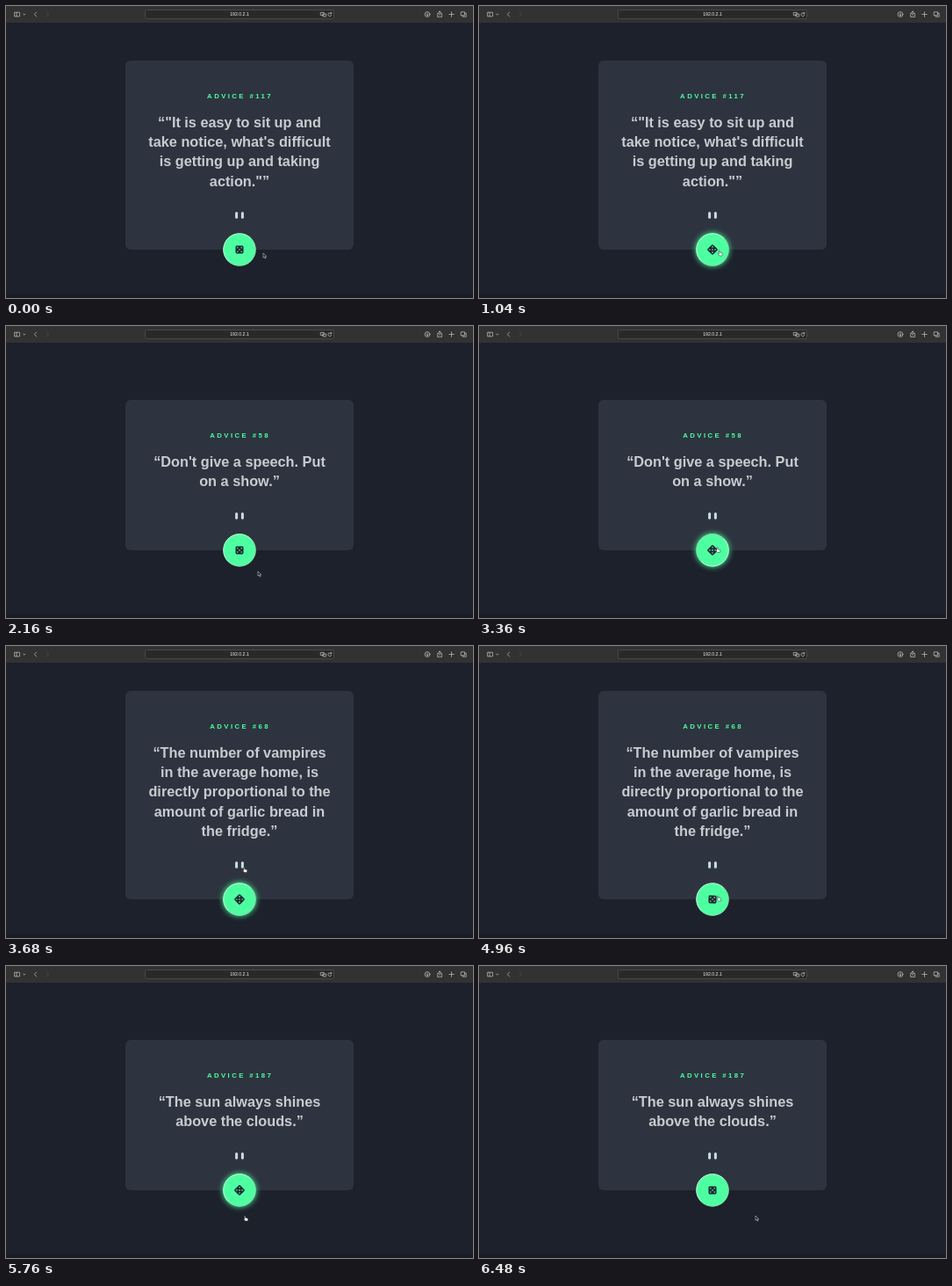
These frames come from a looping animation (532x332 px, 6560 ms). An HTML page:

```html
<!DOCTYPE html>
<html lang="en">
<head>
<meta charset="utf-8">
<title>Advice generator</title>
<style>
  html, body { margin: 0; height: 100%; overflow: hidden; background: #1c212c; }
  svg { display: block; width: 532px; height: 332px; }
  text { font-family: "Liberation Sans", Arial, sans-serif; text-anchor: middle; }
  #label { font-size: 7.8px; font-weight: bold; letter-spacing: 2.4px; fill: #4dffa0; }
  #quote { font-size: 16.3px; font-weight: bold; fill: #c8cbcf; }
  .icons { fill: none; stroke: #c4c4c4; stroke-width: .7; stroke-linecap: round; stroke-linejoin: round; }
</style>
</head>
<body>
<svg viewBox="0 0 532 332">
  <defs>
    <filter id="blur" x="-50%" y="-50%" width="200%" height="200%">
      <feGaussianBlur stdDeviation="3.2"/>
    </filter>
  </defs>
  <rect width="532" height="332" fill="#1c212c"/>
  <rect y="328" width="532" height="4" fill="#181c27"/>

  <!-- browser toolbar -->
  <rect width="532" height="19" fill="#323232"/>
  <rect x="158.5" y="4.5" width="215" height="10" rx="2.2" fill="#292929" stroke="#505050" stroke-width=".8"/>
  <text x="266" y="11.4" font-size="5.2" fill="#f0f0f0">192.0.2.1</text>
  <g class="icons">
    <path d="M10 7.2h5.6v4.6H10zM12 7.2v4.6M19.6 9l1.2 1.2L22 9M34.8 7l-2.5 2.5 2.5 2.5"/>
    <path d="M46.2 7l2.5 2.5-2.5 2.5" stroke="#555"/>
    <path d="M358.6 7.4h3.6v3h-3.6zM361.2 9h3.4v3h-3.4zM370.6 8.6a2 2 0 1 0 .2 1.8M370.8 7.2v1.5h-1.5"/>
    <circle cx="480" cy="9.5" r="2.9"/>
    <path d="M480 8v3m-1.2-1.2l1.2 1.2 1.2-1.2"/>
    <path d="M492.8 8.4h-1.2v4h4.8v-4h-1.2M494 10.4V6m-1.3 1.3L494 6l1.3 1.3"/>
    <path d="M507.5 6.8v5.4m-2.7-2.7h5.4"/>
    <path d="M518.6 6.8h4v4h-4zM522.6 8.2h1.6v4h-4v-1.4"/>
  </g>

  <rect id="card" x="136" width="260" rx="6" fill="#2d343f"/>
  <text id="label"></text>
  <g id="quote"></g>

  <!-- origin: centre of the button -->
  <g id="base">
    <g fill="#cbdce2">
      <rect x="-4.9" y="-43" width="3" height="7.8" rx="1.5"/>
      <rect x="1.9" y="-43" width="3" height="7.8" rx="1.5"/>
    </g>
    <circle id="glow" r="19" fill="#4dffa0" filter="url(#blur)"/>
    <circle r="18.6" fill="#4dffa0"/>
    <g id="rim" fill="none" stroke-width=".8">
      <path d="M-12.9 12.9A18.2 18.2 0 0 1 12.9 -12.9" stroke="#e6f5ec"/>
      <path d="M12.9 -12.9A18.2 18.2 0 0 1 -12.9 12.9" stroke="#9fcdb3"/>
    </g>
    <g id="die" fill="#4dffa0">
      <rect x="-4.5" y="-4.5" width="9" height="9" rx="1.4" fill="#1f2632"/>
      <circle r=".8"/>
      <circle cx="-2.2" cy="-2.2" r=".8"/>
      <circle cx="2.2" cy="-2.2" r=".8"/>
      <circle cx="-2.2" cy="2.2" r=".8"/>
      <circle cx="2.2" cy="2.2" r=".8"/>
    </g>
  </g>

  <g id="cursor" stroke-linejoin="round">
    <path id="arrow" d="M0 0v5.2l1.2-1.1.9 1.9.9-.4-.9-1.8h1.7z" fill="#111" stroke="#eee" stroke-width=".5"/>
    <path id="hand" d="M0 .3q.6-.6 1 .1l.5 1.8 2 .5q.9.3.8 1.2l-.5 2.1H1.1L-.8 3.7q0-.7.8-.3l.5.4z" fill="#fff" stroke="#222" stroke-width=".5"/>
  </g>
</svg>
<script>
const LOOP = 6560, FADE = 270;
const $ = id => document.getElementById(id);

const advice = [
  { at: 0, no: 117, lines: ['“"It is easy to sit up and', "take notice, what's difficult", 'is getting up and taking', 'action."”'] },
  { at: 1520, no: 58, lines: ["“Don't give a speech. Put", 'on a show.”'] },
  { at: 3680, no: 68, lines: ['“The number of vampires', 'in the average home, is', 'directly proportional to the', 'amount of garlic bread in', 'the fridge.”'] },
  { at: 5760, no: 187, lines: ['“The sun always shines', 'above the clouds.”'] }
];

// start, end, then the cursor position reached
const moves = [
  [0, 0, 293, 281], [80, 600, 273, 278], [1840, 2080, 287, 279],
  [2480, 2860, 270.5, 251.5], [3720, 4320, 315, 286],
  [4480, 4960, 271.5, 284], [6210, 6440, 315, 284]
];
const hovers = [[400, 1840], [2660, 3720], [4930, 6210]];
const presses = [[1360, 1480], [3360, 3500], [5520, 5660]];

const ease = (t, a, b) => {
  const p = b > a ? Math.min(1, Math.max(0, (t - a) / (b - a))) : +(t >= a);
  return p * p * (3 - 2 * p);
};
const within = (t, spans) => spans.some(([a, b]) => t >= a && t < b);

let shown;
function showAdvice(item) {
  if (item === shown) return;
  shown = item;
  const n = item.lines.length;
  const height = 126.6 + 22.1 * n, top = 169.5 - height / 2;
  $('card').setAttribute('y', top);
  $('card').setAttribute('height', height);
  $('label').setAttribute('x', 266.6);
  $('label').setAttribute('y', top + 43);
  $('label').textContent = 'ADVICE #' + item.no;
  $('quote').innerHTML = item.lines
    .map((line, i) => `<text x="266" y="${top + 76 + 22.2 * i}">${line}</text>`).join('');
  $('base').setAttribute('transform', `translate(266 ${top + height})`);
}

function draw(t) {
  showAdvice(advice.filter(a => a.at <= t).pop());

  let x = 0, y = 0;
  for (const [a, b, toX, toY] of moves) {
    const k = ease(t, a, b);
    x += (toX - x) * k;
    y += (toY - y) * k;
  }
  $('cursor').setAttribute('transform', `translate(${x} ${y})`);

  const over = within(t, hovers);
  $('arrow').style.display = over ? 'none' : '';
  $('hand').style.display = over ? '' : 'none';

  const hover = hovers.reduce((s, [a, b]) => s + ease(t, a, a + FADE) - ease(t, b, b + FADE), 0);
  $('glow').setAttribute('opacity', hover * .9);
  $('die').setAttribute('transform', `rotate(${45 * hover})`);
  $('rim').setAttribute('transform', `rotate(${within(t, presses) ? 180 : 0})`);
}

const start = performance.now();
function tick(now) {
  draw(Math.max(0, now - start) % LOOP);
  requestAnimationFrame(tick);
}
draw(0);
requestAnimationFrame(tick);
</script>
</body>
</html>
```
